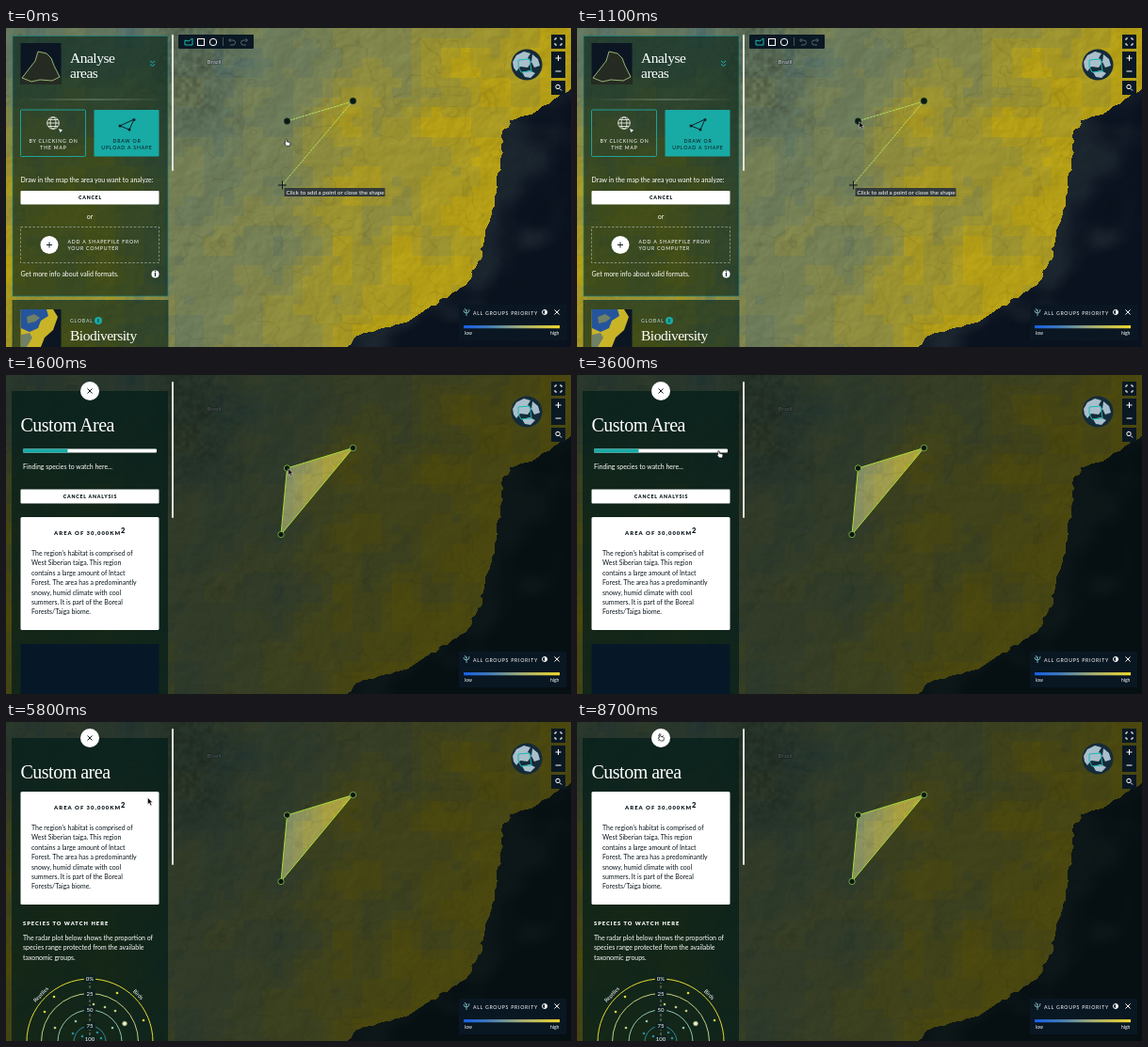
Animation, 600 px wide and 339 px high, one loop 8800 ms. Source, as an HTML page with a canvas:

```html
<!DOCTYPE html>
<html lang="en">
<head>
<meta charset="utf-8">
<title>Custom area analysis</title>
<style>
  html, body { margin: 0; width: 100%; height: 100%; overflow: hidden; background: #0a1420; }
  canvas, svg { position: absolute; left: 0; top: 0; width: 600px; height: 339px; }
  text { font: 6.95px Lato, sans-serif; fill: #fff; }
  .title { font: 15.5px "Liberation Serif", serif; letter-spacing: -.5px; }
  .big { font-size: 20px; }
  .caps { font-size: 5.2px; letter-spacing: .8px; }
  .bold { font-weight: 900; }
  .mid { text-anchor: middle; }
  .dark text, text.dark { fill: #0a161c; }
  .tiny { font-size: 5px; }
  .box { fill: #0a1823; }
  .line { fill: none; stroke: #fff; stroke-width: 1; }
  .teal { stroke: #18bab5; }
  .panel { fill: #08251b; fill-opacity: .66; stroke: #1b8583; stroke-width: .7; }
  .vertex circle { fill: #0b1715; stroke: #173c24; stroke-width: .8; }
  #analysis .vertex circle { stroke: #8cc648; }
</style>
</head>
<body>
<canvas id="map" width="600" height="339"></canvas>
<svg viewBox="0 0 600 339">
  <defs>
    <linearGradient id="scale">
      <stop stop-color="#175ee8"/><stop offset=".25" stop-color="#3d78b8"/>
      <stop offset=".6" stop-color="#a2ac72"/><stop offset="1" stop-color="#eed52b"/>
    </linearGradient>
    <linearGradient id="fade">
      <stop stop-color="#fff" stop-opacity="0"/><stop offset=".5" stop-color="#bcd0b0" stop-opacity=".5"/>
      <stop offset="1" stop-color="#fff" stop-opacity="0"/>
    </linearGradient>
    <g id="card">
      <rect x="15.5" y="151" width="147" height="120" rx="1.5" fill="#fff"/>
      <g class="dark">
        <text class="bold caps" x="51" y="170" style="font-size:5.9px;letter-spacing:1.05px">AREA OF 30,000KM</text>
        <text class="bold" x="122" y="168" style="font-size:7.5px">2</text>
        <g data-lines="27,192,10.4">The region's habitat is comprised of|West Siberian taiga. This region|contains a large amount of Intact|Forest. The area has a predominantly|snowy, humid climate with cool|summers. It is part of the Boreal|Forests/Taiga biome.</g>
      </g>
    </g>
  </defs>

  <text x="221" y="38" class="mid" style="font-size:6.3px;fill:#c4cac5;stroke:#3b4649;stroke-width:1.2px;paint-order:stroke">Brazil</text>

  <g id="drawing">
    <path d="M298 99L368 78L293 167" class="line" stroke-opacity=".2"/>
    <path d="M298 99L368 78L293 167" class="line" style="stroke:#a9e84d" stroke-dasharray="2 1.5"/>
    <g class="vertex"><circle cx="298.5" cy="99" r="3.2"/><circle cx="368.5" cy="77.5" r="3.2"/></g>
    <path d="M293.5 162.5v9M289 167h9" class="line" style="stroke:#101818"/>
    <rect x="295.5" y="170" width="107" height="9" fill="#333a3a"/>
    <text x="297.5" y="176.8" style="font-size:6.25px">Click to add a point or close the shape</text>

    <rect x="183" y="7" width="80" height="15" rx="1" class="box"/>
    <path d="M190 18v-5l4 1 4-3v7z" class="line teal"/>
    <rect x="203.5" y="11.5" width="7" height="7" class="line"/><circle cx="220" cy="15" r="3.7" class="line"/>
    <path d="M230.5 10v9" class="line" stroke-opacity=".25"/>
    <path d="M238.5 11l-2 2 2 2M237 13h4a2.5 2.5 0 010 5h-3M254.5 11l2 2-2 2M256 13h-4a2.5 2.5 0 000 5h3" class="line" style="stroke:#56646b"/>

    <rect x="7" y="8.5" width="165" height="276.5" class="panel"/>
    <rect x="7" y="289.5" width="165" height="60" class="panel" style="stroke:#123f3c"/>
    <rect x="15.5" y="16" width="43" height="44" fill="#0b1622"/>
    <path d="M16 53l8-9 7-9 3-10 9 2 5 5 3 8 7 12v8H16z" fill="#252b22"/>
    <path d="M17 53l7-9 7-9 3-10 9 2 5 5 3 8 6 12-8 4-13-1-9 2z" class="line" style="stroke:#b5d58b;stroke-width:.8"/>
    <text class="title" x="68" y="37">Analyse</text><text class="title" x="68" y="52.5">areas</text>
    <path d="M153 35l2.5 2 2.5-2M153 38.5l2.5 2 2.5-2" class="line teal"/>
    <rect x="20" y="75.5" width="145" height="1" fill="url(#fade)"/>
    <rect x="15.5" y="87" width="69" height="49.5" rx="1" class="line teal" stroke-opacity=".8"/>
    <rect x="93.5" y="87" width="69" height="49.5" rx="1" fill="#18aaa5"/>
    <g class="line" style="stroke-width:.8"><circle cx="50" cy="101" r="6.3"/><ellipse cx="50" cy="101" rx="3" ry="6.3"/><path d="M43.7 101h12.6M45 97.5h10M45 104.5h10"/></g>
    <path d="M56 107l4 1.5-2.5 2.5z" fill="#fff"/>
    <path d="M121 104l15-7-5 11z" class="line" style="stroke:#0b2226"/>
    <g fill="#0b2226"><circle cx="121" cy="104" r="1.5"/><circle cx="136" cy="97.5" r="1.5"/><circle cx="131" cy="108" r="1.5"/></g>
    <g class="mid">
      <text class="caps" x="50.5" y="122">BY CLICKING ON</text><text class="caps" x="50.5" y="129">THE MAP</text>
      <text class="caps dark" x="128.5" y="122">DRAW OR</text><text class="caps dark" x="128.5" y="129">UPLOAD A SHAPE</text>
    </g>
    <text x="15.5" y="163.5">Draw in the map the area you want to analyze:</text>
    <rect x="15.5" y="173" width="147" height="14.5" rx="1" fill="#fff"/>
    <text class="caps bold mid dark" x="89.5" y="182">CANCEL</text>
    <text class="mid" x="89" y="202.5">or</text>
    <rect x="15.5" y="211.5" width="147" height="38" class="line" stroke-opacity=".4" stroke-dasharray="2.5 1.8"/>
    <circle cx="46" cy="230.5" r="9.5" fill="#fff"/><path d="M46 227.5v6M43 230.5h6" class="line" style="stroke:#102024"/>
    <text class="caps" x="65.5" y="229">ADD A SHAPEFILE FROM</text><text class="caps" x="65.5" y="236">YOUR COMPUTER</text>
    <text x="15.5" y="264">Get more info about valid formats.</text>
    <circle cx="158.5" cy="261.5" r="4" fill="#fff"/><text class="bold mid dark" x="158.5" y="264">i</text>

    <rect x="15.5" y="299" width="43" height="40" fill="#0b1622"/>
    <path d="M15.500 299H50l5 8-5 14-9 8-4 10H15.500z" fill="#c9b428"/>
    <path d="M15.500 299H43l2 7-8 5-3 8-9 4-9-4z" fill="#24559c"/>
    <path d="M22 307l8-3 6 4-5 4-8 2zM16 326l9-2 3 5-6 10h-6z" fill="#6f8067"/>
    <text class="caps" x="68" y="313" style="fill:#c5dedb">GLOBAL</text>
    <circle cx="98" cy="311" r="4" fill="#18aaa5"/><text class="bold mid tiny dark" x="98" y="313">i</text>
    <text class="title" x="68" y="332">Biodiversity</text><text class="title" x="68" y="348.5">priority areas</text>
  </g>

  <g id="analysis">
    <path d="M0 0H600V339H0zM298.5 99L292 169.5L368.5 77.5z" fill="#040e0b" fill-opacity=".6" fill-rule="evenodd"/>
    <path d="M298.5 99L368.5 77.5L292 169.5z" fill="#fff3a0" fill-opacity=".15" stroke="#a6dc3c"/>
    <g class="vertex"><circle cx="298.5" cy="99" r="3.2"/><circle cx="368.5" cy="77.5" r="3.2"/><circle cx="292" cy="169.5" r="3.2"/></g>
    <rect x="6" y="17" width="166" height="330" fill="#051e1a" fill-opacity=".76"/>
    <circle cx="89" cy="17" r="10" fill="#fff"/>
    <path d="M86.5 14.5l5 5M91.5 14.5l-5 5" class="line" style="stroke:#142023"/>
    <g id="loading">
      <text class="title big" x="15.5" y="60">Custom Area</text>
      <rect x="18" y="78.5" width="142" height="4" rx="1" fill="#fff"/><rect x="18" y="78.5" width="47.5" height="4" rx="1" fill="#18aaa5"/>
      <text x="18" y="100">Finding species to watch here...</text>
      <rect x="15.5" y="121.5" width="147" height="15" rx="1" fill="#fff"/>
      <text class="caps bold mid dark" x="89.5" y="131">CANCEL ANALYSIS</text>
      <use href="#card"/>
      <rect x="15.5" y="286" width="147" height="60" fill="#061827"/>
    </g>
    <g id="result">
      <text class="title big" x="15.5" y="60">Custom area</text>
      <use href="#card" y="-77"/>
      <text class="caps bold" x="18" y="215.5" style="font-size:5.7px;letter-spacing:1.05px">SPECIES TO WATCH HERE</text>
      <g data-lines="18,232,10.4">The radar plot below shows the proportion of|species range protected from the available|taxonomic groups.</g>
      <g id="radar"></g>
      <text class="mid" transform="translate(38.5 291) rotate(-46)" style="font-size:5.8px">Reptiles</text>
      <text class="mid" transform="translate(139 291) rotate(46)" style="font-size:5.8px">Birds</text>
    </g>
  </g>

  <rect x="176" y="7" width="2" height="145" rx="1" fill="#dfe3dd"/>
  <circle cx="553" cy="39" r="16.5" fill="#142b39"/>
  <path d="M538 36l4-7 8-4 7 2-3 5 4 4-4 6-8-1-4 5-3-4zM559 28l6 5 2 7-6 2-3-6zM548 47l8-2 6 3-5 5-6-1z" fill="#a9bfcb"/>
  <path d="M544 34l12-1 2 13-11 1-3-6z" class="line teal"/>
  <g class="box"><rect x="579" y="7" width="15" height="15"/><rect x="579" y="25" width="15" height="28"/><rect x="579" y="56" width="15" height="15"/></g>
  <path d="M583 13v-2h2M588 11h2v2M590 16v2h-2M585 18h-2v-2M586.5 29v6M583.5 32h6M583.5 46h6M588 64.5l2 2" class="line"/>
  <circle cx="586" cy="62.5" r="2.2" class="line"/>

  <rect x="481" y="294" width="114" height="38" class="box" fill-opacity=".95"/>
  <path d="M489 306v-7M486 300q0 3 3 3t3-4M487 298l2 3" class="line" style="stroke:#8fced0;stroke-width:.8"/>
  <text x="496" y="304.5" class="caps" style="letter-spacing:.72px">ALL GROUPS PRIORITY</text>
  <circle cx="572" cy="302" r="2.5" class="line"/><path d="M572 299.5a2.5 2.5 0 010 5z" fill="#fff"/>
  <path d="M582.5 299.5l5 5M587.5 299.5l-5 5" class="line"/>
  <rect x="486" y="316" width="102" height="3.2" fill="url(#scale)"/>
  <text class="tiny" x="487" y="325.5">low</text><text class="tiny" x="578" y="325.5">high</text>

  <g id="cursor" stroke-linejoin="round">
    <path id="arrow" d="M0 0v7l1.7-1.5 1.2 2.8 1.3-.6-1.2-2.700h2.2z" fill="#080808" stroke="#e8e8e8" stroke-width=".5"/>
    <path id="hand" d="M-.7.3q.9-.8 1.5.2v2.3l3 .8q.8.300.6 1.300l-.5 2.600H.4L-1.800 4.600q.2-1 1.100-.300z" fill="#fff" stroke="#111" stroke-width=".7"/>
  </g>
</svg>
<script>
const LOOP = 8800, ANALYSIS_AT = 1600, RESULT_AT = 5800;
const $ = id => document.getElementById(id);
const clamp = v => Math.max(0, Math.min(1, v));
const smooth = v => (v = clamp(v)) * v * (3 - 2 * v);
const mix = (a, b, k) => a + (b - a) * k;
const mixAll = (a, b, k) => a.map((v, i) => mix(v, b[i], k));

function hash(x, y) {
  const s = Math.sin(x * 127.1 + y * 311.7) * 43758.5453;
  return s - Math.floor(s);
}
function noise(x, y) {
  const i = Math.floor(x), j = Math.floor(y), u = smooth(x - i), v = smooth(y - j);
  return mix(mix(hash(i, j), hash(i + 1, j), u), mix(hash(i, j + 1), hash(i + 1, j + 1), u), v);
}
const height = (x, y) => noise(x / 22, y / 22) + noise(x / 9 + 40, y / 9) * .45 + noise(x / 4, y / 4 + 70) * .2;

// Shoreline as x for each y, joined by straight pieces.
const shore = [[650, 0], [630, 48], [600, 64], [572, 82], [556, 91], [534, 98], [526, 115], [525, 135], [522, 161],
  [520, 188], [511, 214], [505, 241], [494, 257], [489, 273], [461, 289], [440, 304], [424, 312], [392, 321], [371, 327], [360, 340]];
function shoreX(y) {
  const n = shore.findIndex(p => p[1] > y), [x0, y0] = shore[n - 1], [x1, y1] = shore[n];
  return mix(x0, x1, (y - y0) / (y1 - y0));
}

function priorityColor(x, y) {
  const size = 10.5, cx = Math.floor(x / size) * size, cy = Math.floor(y / size) * size;
  const coast = .55 * smooth((cx + cy * .35 - 290) / 270);
  const west = .5 * clamp((175 - cx) / 70) * clamp(.1 + cy / 190);
  const northWest = .3 * clamp((310 - cx) / 120) * clamp((150 - cy) / 120);
  const inland = .22 * Math.exp(-(((cx - 362) / 36) ** 2) - ((cy - 105) / 75) ** 2);
  const patch = (noise(cx / 32 + 9, cy / 32 + 4) - .5) * .34 + (hash(cx, cy) - .5) * .05;
  const level = clamp(Math.round((.42 + coast + west - northWest + inland + patch) * 9) / 9);
  const grey = [80, 108, 104], olive = [122, 130, 82], yellow = [180, 158, 22];
  return level < .5 ? mixAll(grey, olive, level * 2) : mixAll(olive, yellow, level * 2 - 1);
}

function paintMap() {
  const ctx = $("map").getContext("2d"), image = ctx.createImageData(600, 339);
  for (let y = 0; y < 339; y++) {
    const edge = shoreX(y);
    for (let x = 0; x < 600; x++) {
      const slope = height(x + 1, y + 1) - height(x, y);
      const offshore = x - edge + (noise(x / 6, y / 6) - .5) * 6;
      let color, light;
      if (offshore > 0) {
        const depth = smooth(offshore / 70 + noise(x / 28, y / 28) * 1.4 - .6);
        color = mixAll([27, 37, 46], [10, 18, 31], depth);
        light = 1 + slope * .4;
      } else {
        color = priorityColor(x, y);
        const vein = Math.abs(noise(x / 34 + 20, y / 34) + noise(x / 11, y / 11) * .35 - .68);
        const forest = clamp((260 - x) / 60) * clamp((130 - y) / 50) * clamp((x - 150) / 30);
        light = 1 + slope * .45 - .07 * clamp(1 - vein * 40) - forest * .25 * noise(x / 4, y / 4);
      }
      image.data.set([...color.map(v => v * light), 255], (y * 600 + x) * 4);
    }
  }
  ctx.putImageData(image, 0, 0);
}

function layLines() {
  for (const group of document.querySelectorAll("[data-lines]")) {
    const [x, y, step] = group.dataset.lines.split(",").map(Number);
    group.innerHTML = group.textContent.split("|")
      .map((line, i) => `<text x="${x}" y="${y + i * step}">${line}</text>`).join("");
  }
}

function drawRadar() {
  const rings = [[67, "#e6d936", "0%"], [51.5, "#c3cf83", "25"], [34, "#8fc2ad", "50"], [17, "#2d8ca0", "75"], [3, "#2672a0", "100"]];
  const dots = [[118, 288, 0], [146, 317, 0], [51, 292, 0], [41, 308, 0], [52, 325, 1], [93, 300, 1], [105, 303, 1],
    [116, 307, 1], [74, 318, 2], [113, 325, 2], [71, 331, 3], [81, 334, 3], [97, 330, 3], [101, 336, 3]];
  $("radar").innerHTML =
    rings.map(([r, color]) => `<circle cx="89" cy="340" r="${r}" fill="none" stroke="${color}"/>`).join("") +
    `<path d="M89 275v64" stroke="#ccc" stroke-width=".6" stroke-dasharray="3 2"/>` +
    rings.map(([r, , label]) => `<rect x="83" y="${336 - r}" width="12" height="8" fill="#0d211f"/>
      <text class="mid" x="89" y="${342.3 - r}" style="font-size:6px">${label}</text>`).join("") +
    dots.map(([x, y, ring]) => `<circle cx="${x}" cy="${y}" r="1.3" fill="${rings[ring][1]}"/>`).join("") +
    `<circle cx="126" cy="320.5" r="2.3" fill="#f0f0cc" stroke="#9cae72"/>`;
}

// [start, end, from, to] for each pointer move.
const moves = [
  [0, 600, [297.5, 118], [299.7, 99.5]],
  [2300, 3500, [299.7, 99.5], [150.5, 80.5]],
  [7700, 8600, [150.5, 80.5], [88, 12.5]]
];

function render(now) {
  const t = now % LOOP;
  const [start, end, from, to] = moves.filter(m => t >= m[0]).pop();
  const [x, y] = mixAll(from, to, smooth((t - start) / (end - start)));
  const overButton = Math.hypot(x - 89, y - 14) < 10;
  const hand = t < 1000 || (t >= 3300 && t < RESULT_AT) || overButton;
  const show = (id, on) => $(id).style.display = on ? "" : "none";
  show("drawing", t < ANALYSIS_AT);
  show("analysis", t >= ANALYSIS_AT);
  show("loading", t < RESULT_AT);
  show("result", t >= RESULT_AT);
  show("hand", hand);
  show("arrow", !hand);
  $("cursor").setAttribute("transform", `translate(${x} ${y})`);
}

paintMap();
layLines();
drawRadar();
const began = performance.now();
(function frame() {
  render(performance.now() - began);
  requestAnimationFrame(frame);
})();
</script>
</body>
</html>
```
